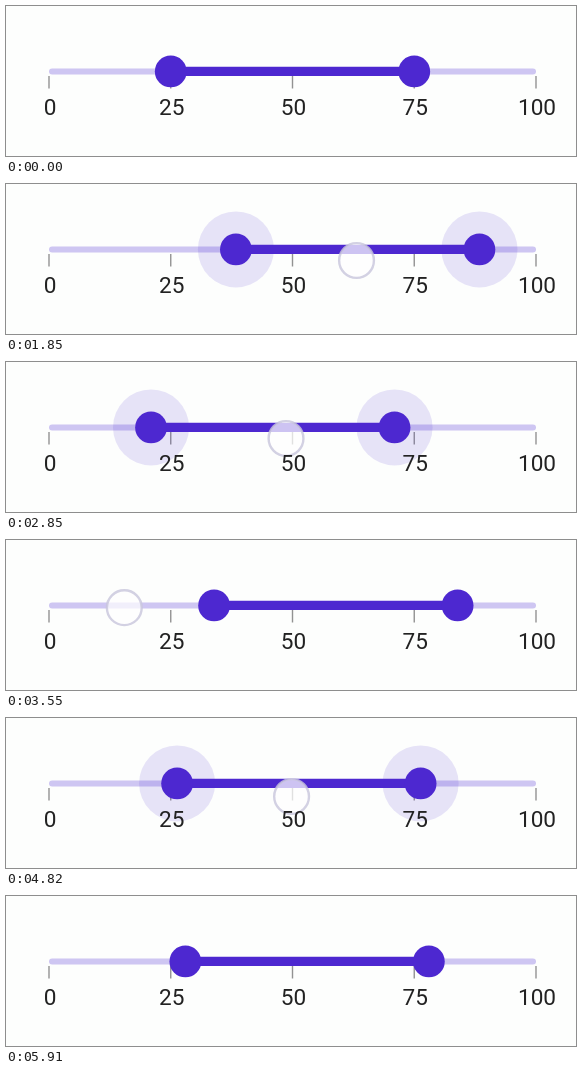
Animation, 570 px wide and 150 px high, one loop 6.73 s. Source, as an HTML page:

```html
<!DOCTYPE html>
<html lang="en">
<head>
<meta charset="utf-8">
<title>Range slider</title>
<style>
  html, body { margin: 0; width: 100%; height: 100%; overflow: hidden; background: #fdfefd; }
  svg { display: block; width: 570px; height: 150px; }
  text { font: 22.6px Roboto, sans-serif; fill: #222; text-anchor: middle; }
  .track { stroke: #cec6f2; stroke-width: 6; stroke-linecap: round; }
  .tick { stroke: #929292; stroke-width: 1.4; }
  .active { stroke: #4d28d0; stroke-width: 9.2; }
  .thumb { fill: #4d28d0; }
  .halo { fill: #4d28d0; fill-opacity: .125; }
  #touch { fill: #fff; fill-opacity: .72; stroke: #c9c6dd; stroke-opacity: .8; stroke-width: 2.4; }
</style>
</head>
<body>
<svg viewBox="0 0 570 150">
  <line class="track" x1="46" x2="527" y1="65.4" y2="65.4"/>
  <g id="ticks"></g>
  <circle class="halo" cy="65.4"/>
  <circle class="halo" cy="65.4"/>
  <line class="active" y1="65.4" y2="65.4"/>
  <circle class="thumb" cy="65.4" r="15.9"/>
  <circle class="thumb" cy="65.4" r="15.9"/>
  <circle id="touch" r="17.4"/>
  <g id="labels"></g>
</svg>
<script>
const LOOP = 6730, FRAME = 700 / 11, FADE = 180, STEPS = 4;
const $ = s => document.querySelector(s), $$ = s => [...document.querySelectorAll(s)];
const set = (el, attrs) => { for (const k in attrs) el.setAttribute(k, attrs[k]); };
const clamp = v => Math.max(0, Math.min(1, v));
const ease = p => (1 - Math.cos(Math.PI * clamp(p))) / 2;
const toX = value => 43 + 4.87 * value;

for (let i = 0; i <= STEPS; i++) {
  const value = 100 * i / STEPS, x = toX(value);
  $('#ticks').innerHTML += `<line class="tick" x1="${x}" x2="${x}" y1="70" y2="82.5"/>`;
  $('#labels').innerHTML += `<text x="${x + 1}" y="109.2">${value}</text>`;
}

// Swings of the lower thumb; the upper one stays 50 above it.
const swings = [
  { from: 1450, to: 1920, value: 39.4 },
  { from: 1920, to: 2710, value: 18.7 },
  { from: 2710, to: 3297, value: 33.9 },
  { from: 4587, to: 5090, value: 17.9 },
  { from: 5090, to: 5650, value: 28 }
];
const lowerValue = t => swings.reduce(
  (value, s) => value + (s.value - value) * ease((t - s.from) / (s.to - s.from)), 25);

// Taps hold one place; drags grip the bar and lead the thumb by a moment.
const touches = [
  { from: 300, to: 750, x: 478, y: 72 },
  { from: 1320, to: 3420, grip: 116, lead: 110, y: 76.5 },
  { from: 3470, to: 3980, x: 118.3, y: 67.7 },
  { from: 4400, to: 5890, grip: 130, lead: 65, y: 78.5 }
];
const touchX = (touch, t) => touch.x ?? toX(lowerValue(t + touch.lead)) + touch.grip;
const haloSize = (touch, t) => touch?.grip
  ? ease(Math.min(t - touch.from, touch.to - 80 - t) / FADE) : 0;

const halos = $$('.halo'), thumbs = $$('.thumb'), active = $('.active'), dot = $('#touch');

function draw(t) {
  const lower = lowerValue(t);
  const ends = [toX(lower), toX(lower + 50)];
  const touch = touches.find(c => t >= c.from && t < c.to);
  const size = haloSize(touch, t);

  ends.forEach((cx, i) => {
    set(thumbs[i], { cx });
    set(halos[i], { cx, r: 16 + 22 * size, opacity: size });
  });
  set(active, { x1: ends[0], x2: ends[1] });
  set(dot, touch
    ? { cx: touchX(touch, t), cy: touch.y, opacity: clamp((touch.to - t) / FADE) }
    : { opacity: 0 });
}

// Hold each pose for one low-rate frame.
const sampled = t => Math.floor((t + 26) / FRAME) * FRAME - 6;

const began = performance.now();
function tick() {
  draw(sampled((performance.now() - began) % LOOP));
  requestAnimationFrame(tick);
}
tick();
</script>
</body>
</html>
```
